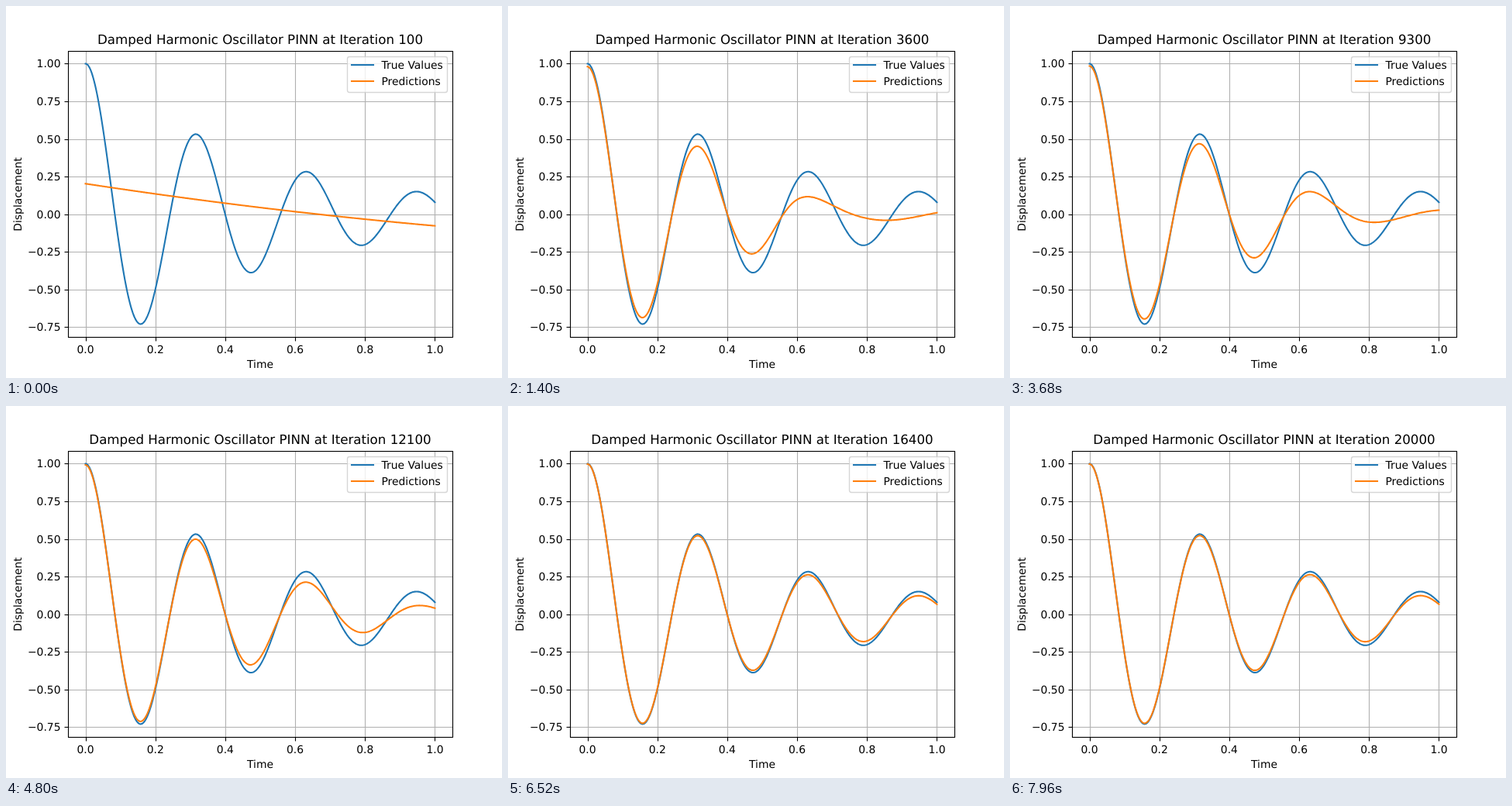
An HTML page that plays this animation: 640x480 px, repeating every 8 s.

```html
<!DOCTYPE html>
<html lang="en">
<head>
<meta charset="utf-8">
<title>Damped oscillator training</title>
<style>
  html, body { margin: 0; width: 100%; height: 100%; overflow: hidden; background: #fff; }
  svg { display: block; width: 640px; height: 480px; }
  text { font: 13.89px "DejaVu Sans", sans-serif; fill: #000; text-rendering: geometricPrecision; }
  .title { font-size: 16.67px; }
  .grid { stroke: #b0b0b0; stroke-width: 1.11; }
  .axis { stroke: #000; stroke-width: 1.11; fill: none; }
  .curve { fill: none; stroke-width: 2.083; stroke-linecap: square; stroke-linejoin: round; }
  .true { stroke: #1f77b4; }
  .pred { stroke: #ff7f0e; }
</style>
</head>
<body>
<svg id="stage" viewBox="0 0 640 480"></svg>
<script>
const FRAME_MS = 40, FRAMES = 200, SAMPLES = 400;
const DAMPING = 2, OMEGA = Math.sqrt(20 ** 2 - DAMPING ** 2);
const stage = document.getElementById('stage');

function add(tag, attrs, text) {
  const el = document.createElementNS('http://www.w3.org/2000/svg', tag);
  for (const name in attrs) el.setAttribute(name, attrs[name]);
  if (text !== undefined) el.textContent = text;
  return stage.appendChild(el);
}
const line = (cls, x1, y1, x2, y2) => add('line', { class: cls, x1, y1, x2, y2 });
const label = (text, x, y, anchor = 'middle', more = {}) =>
  add('text', { x, y, 'text-anchor': anchor, ...more }, text);

const mix = (a, b, k) => a + (b - a) * k;
const logistic = x => 1 / (1 + Math.exp(-x));

const truth = t =>
  Math.exp(-DAMPING * t) * (Math.cos(OMEGA * t) + DAMPING / OMEGA * Math.sin(OMEGA * t));
const untrained = t => 0.203 - 0.354 * t + 0.074 * t * t;

const lowest = truth(Math.PI / OMEGA);
const px = t => 102.545 + 450.909 * t;
const py = v => 74.4 + 336 * (1 - v) / (1 - lowest);
const snap = v => Math.floor(v + 0.5) + 0.5;

// Training error falls slowly, then drops around iteration 12000
const errorAt = n => 0.12 + 0.9 * (1.1 - n / 30000) * logistic((12000 - n) / 950);

// Share of the amplitude still missing at time t, levelling off at a cap
function missing(t, error) {
  const cap = 0.82, raw = error * (0.02 + 0.15 * t + 1.5 * t ** 2.5);
  return raw / (1 + (raw / cap) ** 6) ** (1 / 6);
}

// Late oscillations run behind while the error is large
function lag(t, error) {
  const late = t - 0.61;
  return 0.14 * error ** 2 * (late + Math.hypot(late, 0.05));
}

function predictor(iteration) {
  const error = errorAt(iteration);
  return t => {
    const fitted = (1 - missing(t, error)) * truth(t - lag(t, error));
    const learned = 1 - Math.exp(-(((iteration - 100) / (600 + 700 * t)) ** 2));
    return mix(untrained(t), fitted, learned);
  };
}

function pathOf(f) {
  let d = '';
  for (let i = 0; i <= SAMPLES; i++) {
    const t = i / SAMPLES;
    d += (i ? 'L' : 'M') + px(t).toFixed(2) + ' ' + py(f(t)).toFixed(2);
  }
  return d;
}

const ticks = (from, step, count) => Array.from({ length: count }, (_, i) => from + i * step);
const xTicks = ticks(0, 0.2, 6);
const yTicks = ticks(-0.75, 0.25, 8);
for (const t of xTicks) line('grid', snap(px(t)), 58, snap(px(t)), 427);
for (const v of yTicks) line('grid', 80, snap(py(v)), 576, snap(py(v)));
for (const t of xTicks) {
  line('axis', snap(px(t)), 427.5, snap(px(t)), 432.5);
  label(t.toFixed(1), px(t), 448);
}
for (const v of yTicks) {
  line('axis', 75.5, snap(py(v)), 80.5, snap(py(v)));
  label(v.toFixed(2).replace('-', '\u2212'), 70.5, Math.round(py(v) + 5), 'end');
}

add('path', { class: 'curve true', d: pathOf(truth) });
const prediction = add('path', { class: 'curve pred' });
add('rect', { class: 'axis', x: 80.5, y: 58.5, width: 496, height: 369 });
label('Time', 328, 467);
label('Displacement', 0, 0, 'middle', { transform: 'translate(20 243) rotate(-90)' });
const title = label('', 328, 49, 'middle', { class: 'title' });

add('rect', { x: 440.5, y: 65.5, width: 129, height: 46, rx: 2.8,
  fill: '#fff', 'fill-opacity': 0.8, stroke: '#ccc', 'stroke-opacity': 0.8, 'stroke-width': 1.39 });
[['true', 'True Values', 76], ['pred', 'Predictions', 97]].forEach(([cls, text, y]) => {
  line('curve ' + cls, 446, y, 474, y);
  label(text, 484.5, y + 5, 'start');
});

let shown = -1;
function draw(ms) {
  const frame = Math.floor(ms / FRAME_MS + 1e-6) % FRAMES;
  if (frame === shown) return;
  shown = frame;
  const iteration = (frame + 1) * 100;
  title.textContent = 'Damped Harmonic Oscillator PINN at Iteration ' + iteration;
  prediction.setAttribute('d', pathOf(predictor(iteration)));
}

let start;
function tick(now) {
  start ??= now;
  draw(now - start);
  requestAnimationFrame(tick);
}
draw(0);
requestAnimationFrame(tick);
</script>
</body>
</html>
```
